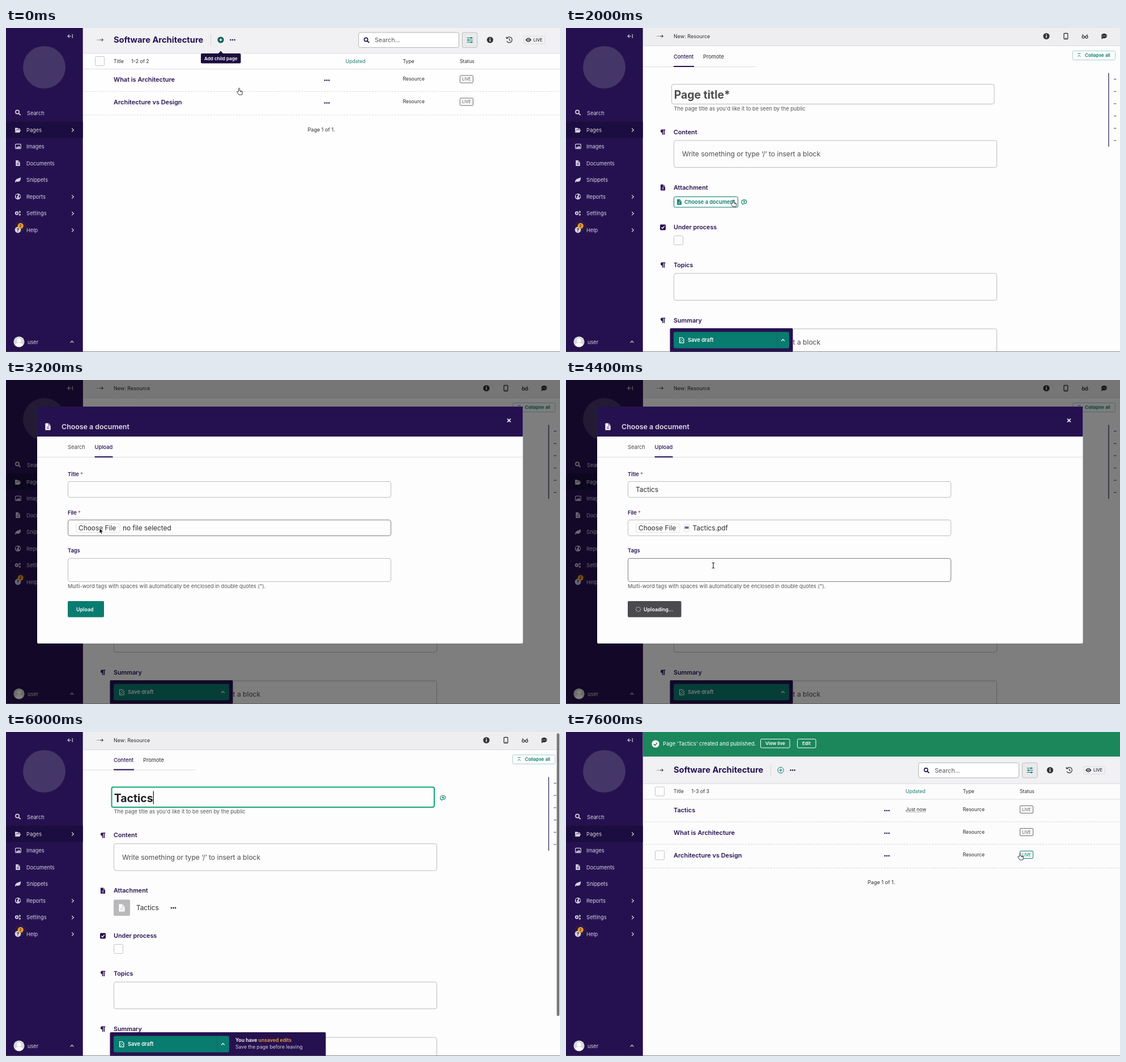
An HTML page that plays this animation: 978x573 px, repeating every 8000 ms.

```html
<!DOCTYPE html>
<html lang="en">
<head>
<meta charset="utf-8">
<title>Adding a child page</title>
<style>
  html, body { margin: 0; width: 100%; height: 100%; overflow: hidden; background: #fff; }
  svg { display: block; width: 978px; height: 573px; font-family: Inter, sans-serif; }
</style>
</head>
<body>
<svg id="stage" viewBox="0 0 978 573"></svg>
<script>
const NAVY = '#261150', DARK = '#1b0d3f', TEAL = '#087c6f', INK = '#2c2c2e', GREY = '#bdbdbf',
      PALE = '#d6d1e0', WHITE = '#fff', PAGE = '#fdfdfd', GOLD = '#eba03c', MID = '#4d4d50';
const LOOP = 8000;

// Drawing helpers; text is placed by the middle of its capitals.
const text = (x, y, s, size = 9.25, fill = INK, weight = 400) =>
  `<text x="${x}" y="${y + size * .36}" font-size="${size}" fill="${fill}" font-weight="${weight}">${s}</text>`;
const bold = (x, y, s, size = 10.75, fill = NAVY) => text(x, y, s, size, fill, 600);
const box = (x, y, w, h, fill, stroke = 'none', r = 0, line = 1) =>
  `<rect x="${x}" y="${y}" width="${w}" height="${h}" rx="${r}" fill="${fill}" stroke="${stroke}" stroke-width="${line}"/>`;
const path = (d, stroke, line = 1.2, fill = 'none', extra = '') =>
  `<path d="${d}" stroke="${stroke}" stroke-width="${line}" fill="${fill}" ${extra}/>`;
const solid = (d, fill) => path(d, 'none', 0, fill);
const disc = (x, y, r, fill, stroke = 'none', line = 1) =>
  `<circle cx="${x}" cy="${y}" r="${r}" fill="${fill}" stroke="${stroke}" stroke-width="${line}"/>`;
const at = (x, y, s, k = 1) => `<g transform="translate(${x} ${y}) scale(${k})">${s}</g>`;
const hline = (x1, x2, y, stroke = '#dcdcde', dash = '') =>
  path(`M${x1} ${y}H${x2}`, stroke, 1, 'none', dash && `stroke-dasharray="${dash}"`);
const dots = (x, y, fill = NAVY, r = 1.3) => [-3.6, 0, 3.6].map(d => disc(x + d, y, r, fill)).join('');
const field = (x, y, w, h, stroke = GREY) => box(x, y, w, h, PAGE, stroke, 3.5);
const checkbox = (x, y) => box(x, y, 16, 16, PAGE, '#c4c4c6', 2);

// Icons
const lens = (x, y, c, k = 1) => at(x, y, disc(-1, -1, 3.1, 'none', c, 1.6) + path('M1.3 1.3L4.6 4.6', c, 1.9), k);
const doc = (x, y, c, gap, k = 1) => at(x, y,
  solid('M-4-5.2H1L4-2.2V5.2H-4Z', c) + path('M1-5V-2H4M-2 .4H2M-2 2.6H2', gap, .8), k);
const chevron = (x, y, c) => path(`M${x - 1.8} ${y - 3}l3.2 3-3.2 3`, c, 1.2);
const caretUp = (x, y, c) => path(`M${x - 2.8} ${y + 1.5}l2.8-2.8 2.8 2.8`, c, 1.2);
const trail = y => [161, 163.4, 165.8].map(x => disc(x, y, .6, INK)).join('') +
  path(`M166 ${y}h5.5m-2.7-2.7l2.7 2.7-2.7 2.7`, INK, 1);
const info = (x, y) => disc(x, y, 5.6, '#333336') + box(x - .8, y - 1, 1.6, 4, WHITE) + disc(x, y - 2.7, .9, WHITE);
const pilcrow = y => at(171, y, solid('M4.5-4.6H-1.2a2.8 2.8 0 0 0 0 5.6V4.8H.4V-3.3H1.6V4.8H3.2V-3.3H4.5Z', NAVY));
const comment = (x, y) => at(x, y, path('M-2.5 3.8C-6 2.6-5.6-3.6 0-3.6S5.6 2.9 0 3.1L-3.2 4.6Z', TEAL, 1.1) +
  path('M-2-.2H2M0-2.2V1.8', TEAL, 1.1));

// Mouse pointers
const arrow = (x, y) => at(x, y, path('M0 0V11.3L2.6 9 4.2 12.8 6.2 12 4.6 8.3H8.2Z', WHITE, 1, '#000'), .82);
const hand = (x, y) => at(x, y, path(
  'M-2 0V-5C-2-6.7.1-6.7.1-5V-1.6L3.6-.9Q5.2-.5 5 1.2L4.2 5.6H-1.4L-4.6 1C-5.3-.4-3.7-1.4-2 .8M1.6-1.2V1M3.4-.8V1',
  '#222', .9, WHITE));
const ibeam = (x, y) => at(x, y, path('M-2.4-5Q0-5 0-3.6Q0-5 2.4-5M0-4V4M-2.4 5Q0 5 0 3.6Q0 5 2.4 5', '#111', 1));

function sidebar() {
  const rows = ['Search', 'Pages', 'Images', 'Documents', 'Snippets', 'Reports', 'Settings', 'Help'];
  const rowY = i => 151 + 29.5 * i;
  const icons = [
    lens(21, 149.5, PALE),
    solid('M16 176.5h4l1.2 1.3h3.6v1.7h-6.3L16 184ZM15.8 185l2.6-4.7h8L24 185Z', PALE),
    box(16.6, 205.3, 9.6, 8, 'none', PALE, 1, 1.2) + solid('M17.5 212.4l2.3-3 1.3 1.5 2-2.8 2.4 4.3Z', PALE),
    doc(21, 239, PALE, NAVY, .95),
    solid('M16 273.5C16 266 21 267 26 264C26.5 271 23 273 18.5 271.5Z', PALE),
    disc(21, 298, 5.2, PALE) + solid('M17 296l3-2.2 1.4 2-2.2 2.4 1.2 3-2.4-1ZM22.5 296l2.6-.6v3l-2 2.6Z', NAVY),
    disc(19, 327.5, 2.2, 'none', PALE, 1.9) + disc(24.3, 325.3, 1.1, 'none', PALE, 1.2) + disc(24.3, 330.2, 1.1, 'none', PALE, 1.2),
    disc(25.7, 350, 10, '#2a1a4a') + disc(21, 357, 5.4, PALE) + text(18.7, 357, '?', 8, NAVY, 700) +
      disc(25.7, 350, 5, '#f2a01d') + text(23.6, 350, '2', 6.6, NAVY, 500),
  ];
  return box(0, 0, 135.7, 573, NAVY) + disc(67.5, 69.5, 37.5, '#443767') +
    path('M109 14.5h6m-3.2-2.8l-2.8 2.8 2.8 2.8M117.3 11v7', PALE, 1.1) +
    box(0, 165.5, 135.7, 29, DARK) +
    rows.map((name, i) => icons[i] + text(i ? 36 : 37, rowY(i), name, 9.25, PALE) +
      ([1, 5, 6, 7].includes(i) ? chevron(118, rowY(i), PALE) : '')).join('') +
    disc(23, 555, 9.6, '#d9d9db') + disc(23, 552.6, 3.7, WHITE) + solid('M16.3 561q1.4-4.2 6.7-4.2t6.7 4.2q-6.7 5.5-13.4 0', WHITE) +
    text(38, 555.5, 'user', 9.25, PALE) + caretUp(116.5, 555, PALE);
}

function listing({ published = false, hover = false }) {
  const dy = published ? 46.5 : 0;
  const rows = [...(published ? ['Tactics'] : []), 'What is Architecture', 'Architecture vs Design'];
  const badge = (y, c) => box(801.5, y - 6.5, 23, 13, PAGE, c, 1.5) + text(805.2, y, 'LIVE', 7.2, c, 500);
  const banner = box(136, 0, 842, 43.5, '#1c875b') + disc(158, 21, 6.6, WHITE) + path('M154.8 21.2l2.3 2.3 4-4.6', '#1c875b', 1.6) +
    text(171, 20.5, "Page 'Tactics' created and published.", 9.25, WHITE) +
    box(343.5, 12.5, 51.5, 15.5, 'none', WHITE, 2) + bold(352, 20.5, 'View live', 8, WHITE) +
    box(408.5, 12.5, 32.5, 15.5, 'none', WHITE, 2) + bold(417, 20.5, 'Edit', 8, WHITE);
  const plus = published
    ? disc(379, 21, 5.2, 'none', TEAL, 1) + path('M376.3 21h5.4M379 18.3v5.4', TEAL, 1.1)
    : disc(379, 21, 5.6, '#0a5f55') + path('M376.3 21h5.4M379 18.3v5.4', WHITE, 1.3);
  const head = box(136, -4, 842, 49, '#f1f0f3') + hline(136, 978, 45, '#dddde0') + trail(21) +
    text(190, 20.7, 'Software Architecture', 14.7, NAVY, 700) + path('M361.5 11v20', '#d4d4d8', 1) + plus + dots(400, 21) +
    box(622.5, 8, 177, 26.5, WHITE, '#b4b4b8', 3) + lens(636.5, 21.5, NAVY) + text(651, 21.5, 'Search...', 10.7, '#57575a') +
    box(805.5, 8, 26.5, 26.5, '#eaeaec', GREY, 3) +
    path('M813.5 17.5h11M813.5 21.2h11M813.5 25h11', TEAL, 1.1) + path('M821 16v3M816.5 19.7v3M821.5 23.5v3', TEAL, 1.8) +
    info(854.5, 21) + path('M884.3 18a5 5 0 1 1-.4 5M883 15.6l.8 3 3-.6M888.6 18.2v3l2 1.4', '#333336', 1.2) +
    box(914, 14.5, 37, 13.5, 'none', '#dcdce0', 2) + solid('M917 21q5.3-7.4 10.6 0q-5.3 7.4-10.6 0', '#333336') +
    disc(922.3, 21, 2.3, WHITE) + disc(922.3, 21, 1.2, '#333336') + bold(931, 21, 'LIVE', 7.4, '#444448');
  const columns = checkbox(157.5, 50.5) + text(190, 58.5, 'Title', 8.7) +
    text(221.5, 58.5, `1-${rows.length} of ${rows.length}`, 8.7) + text(599.5, 58.5, 'Updated', 8.7, '#1f7c70') +
    text(700.5, 58.5, 'Type', 8.7) + text(801, 58.5, 'Status', 8.7) + hline(136, 978, 72.5);
  const body = rows.map((name, i) => {
    const y = 91.5 + 40 * i, last = i === rows.length - 1;
    return bold(190, y, name, 10.95) + dots(566.5, y + 1) + text(700.5, y - 1.5, 'Resource', 8.7) +
      badge(y - 1, hover && last ? TEAL : '#67676a') + (hover && last ? checkbox(157.5, y - 8) : '') +
      (published && !i ? text(599.5, y - 1.5, 'Just now', 8.5) + hline(600, 636, y + 3.5, '#777', '1 1') : '') +
      hline(136, 978, y + (last ? 22.5 : 20.8), '#d8d8da', '3 2');
  }).join('');
  const tip = published ? '' : solid('M375 45l4-4.5 4 4.5Z', DARK) + box(344, 45, 70.5, 17.5, DARK, 'none', 2) +
    bold(350, 53.7, 'Add child page', 8.1, WHITE);
  return box(136, 0, 842, 573, published ? '#fcfcfd' : '#fefefe') +
    at(0, dy, head + columns + body + text(532.5, 99.5 + 40 * rows.length, 'Page 1 of 1.', 9.1) + tip) + (published ? banner : '');
}

const pen = document.createElement('canvas').getContext('2d');
function titleField(typed, focus) {
  pen.font = '700 19.4px Inter, sans-serif';
  const caret = 191.5 + pen.measureText(typed).width;
  return (focus ? box(186.5, 99, 569.5, 35.5, PAGE, '#0fa678', 3, 2) : field(186.5, 99.5, 569.5, 35)) +
    text(190.7, 118, typed || 'Page title*', 19.4, typed ? '#202022' : MID, 700) +
    (focus ? path(`M${caret} 106v23`, '#111', 1.2) + comment(771.5, 117.5) : '');
}

function editor({ typed = '', focus = false, hover = false, attached = false, scroll = 0, bar = false, notice = -1, menu = false }) {
  const label = (y, name, icon = pilcrow(y)) => icon + bold(190, y, name);
  const prompt = 'Write something or type ‘/’ to insert a block';
  const attachment = attached
    ? box(190, 298, 29, 28.5, '#b9b9bb', 'none', 2) + doc(204.5, 312.5, WHITE, '#b9b9bb', 1.25) +
      text(230, 312.5, 'Tactics', 11.8) + dots(295.5, 312.5)
    : box(190.5, 298.5, 113, 18.5, PAGE, TEAL, 2) + doc(200, 307.7, TEAL, WHITE, .95) +
      bold(209, 307.7, 'Choose a document', 9.25, TEAL) + (hover ? comment(314.5, 307.5) : '');
  const content = text(190, 51, 'Content', 9.25, NAVY, 500) + text(242, 51, 'Promote', 9.3) +
    hline(136, 335, 68.5) + box(190, 67, 36, 2, NAVY) +
    titleField(typed, focus) + text(190.5, 142.5, "The page title as you'd like it to be seen by the public", 9.25, '#555558') +
    label(184, 'Content') + field(190.5, 199, 570, 47.5) + text(205, 223, prompt, 12.05, MID) +
    label(282, 'Attachment', doc(171, 282, NAVY, WHITE)) + attachment +
    at(0, attached ? 9.5 : 0,
      label(352.5, 'Under process', box(166, 347.5, 10, 10, NAVY, 'none', 1.5) + path('M168.4 352.6l1.9 1.9 3.4-4', WHITE, 1.4)) +
      checkbox(190.5, 367.5) + label(419, 'Topics') + field(190.5, 434, 570, 47.5) +
      label(517, 'Summary') + field(190.5, 532, 570, 47.5) + text(205, 555.5, prompt, 12.05, MID));
  const header = box(136, 0, 842, 31, '#eeeef0') + hline(136, 978, 31.5, '#dcdcde') + trail(14.5) +
    text(190, 14.5, 'New: Resource', 9) + info(848, 14.5) +
    box(879, 9.5, 6.8, 10, 'none', '#333336', 1, 1.3) + path('M881.4 17.6h2', '#333336', 1) +
    disc(913.2, 16, 2.1, 'none', '#333336', 1.2) + disc(919, 16, 2.1, 'none', '#333336', 1.2) +
    path('M911.2 15.5l1.5-4.7M921 15.5l-1.5-4.7M915.2 15.6h1.8', '#333336', 1) +
    '<ellipse cx="950" cy="14" rx="5.2" ry="4.2" fill="#333336"/>' + solid('M946 15.5l-1 4 4-1.6Z', '#333336') + dots(950, 14, WHITE, .7);
  const tools = box(894.5, 40.5, 75, 16, PAGE, '#a9cfca', 2) + path('M903.5 45.3h5M903.6 50.8l2.4-2.5 2.4 2.5', TEAL, 1) +
    bold(916, 48, 'Collapse all', 8.05, TEAL) + path('M958 79.5V210', NAVY, 1.2) +
    [0, 1, 2, 3, 4, 5].map(i => hline(967, 971.5, 90.5 + 21.7 * i, '#444')).join('');
  const note = notice < 0 ? '' : at(0, notice, box(398, 531, 166.5, 50, NAVY, 'none', 2) +
    bold(405, 544.5, `You have <tspan fill="${GOLD}">unsaved edits</tspan>`, 8.7, WHITE) +
    text(405, 556.5, 'Save the page before leaving', 8.6, PALE));
  const options = menu ? box(183.5, 473, 217, 60, NAVY, 'none', 2) +
    ['Submit for approval', 'Publish'].map((name, i) => box(190, 478 + 28 * i, 204, 27, TEAL) +
      path(`M204 ${496 + 28 * i}v-8m-3 3l3-3 3 3`, WHITE, 1.2) + bold(215, 491.5 + 28 * i, name, 9.25, WHITE)).join('') : '';
  const footer = note + box(183.5, 531, 217, 42, NAVY, 'none', 2) + options + box(190, 537.5, 204, 29, TEAL, 'none', 3) +
    path('M372.5 537.5v29', '#2a5f6a', 1) + caretUp(383, 552, WHITE) +
    path('M200.5 547.5h4.5l3 3v6.5h-7.5Z', WHITE, 1.1) + path('M201 552l5 5M202.5 549.5l5 5M201 555l2 2', WHITE, .8) +
    bold(215, 552, 'Save draft', 9.25, WHITE);
  const thumb = bar ? box(972.3, 1 + scroll * .86, 4.6, 500, '#77777a', 'none', 2.3) : '';
  return box(136, 0, 842, 573, PAGE) + at(0, -scroll, content) + header + tools + footer + thumb;
}

function chooser(y, height, upload, body) {
  const tab = (x, w, name, on) => text(x, 72, name, 9.3, on ? NAVY : '#48484b', on ? 500 : 400) + (on ? box(x, 88, w, 2, NAVY) : '');
  return box(0, 0, 978, 573, 'rgba(0,0,0,.5)') + at(0, y,
    box(55, 0, 857.5, height, PAGE, 'none', 2) + box(55, 0, 857.5, 53, NAVY) +
    doc(74, 35.5, WHITE, NAVY, 1.15) + bold(98, 35.5, 'Choose a document', 12.4, '#e0dce8') +
    path('M885 21.5l6 6m0-6l-6 6', WHITE, 1.7) +
    hline(55, 912, 89.5) + tab(109, 31, 'Search', !upload) + tab(156.5, 32, 'Upload', upload) + body);
}

function searchTab() {
  const long = 'Instructions for The Formatting of Final Thesis Papers';
  const rows = [['arch vs design', 'arch_vs_design', '6 days ago'], ['What is Architectue', 'What_is_Architectue', '1 week ago'],
    [long, long.replaceAll(' ', '_'), '1 week ago']];
  return chooser(51, 411, false, bold(109, 119.5, 'Search term', 9.25) + field(109.5, 132.5, 570, 28) +
    text(123, 147, 'Search', 12, MID) + bold(109, 188, 'Latest documents') +
    text(117, 217, 'Title', 8.2) + text(455, 217, 'File', 8.2) + text(746.5, 217, 'Created', 8.2) + hline(109, 858, 228.5) +
    rows.map(([name, file, age], i) => {
      const y = 246.5 + 34.2 * i;
      return bold(117, y, name, 10.95) + text(455, y - .5, file + '.pdf', 8.5) + text(746.5, y - .5, age, 8.3) +
        hline(747, 789, y + 4, '#777', '1 1') + hline(109, 858, y + 17, '#d2d2d4', '3 2');
    }).join('') + text(460, 355, 'Page 1 of 1.', 8.8));
}

function uploadTab({ file = false, fileActive = false, press = '' }) {
  const star = '<tspan fill="#cd4444"> *</tspan>', busy = press === 'busy';
  const active = on => on ? '#808083' : GREY;
  const spinner = [...Array(8)].map((_, i) => {
    const a = i * Math.PI / 4;
    return disc(127.5 + 4 * Math.cos(a), 358.5 + 4 * Math.sin(a), .75, WHITE);
  }).join('');
  return chooser(47, 419, true,
    bold(109, 119.5, 'Title' + star, 9.25) + field(109.5, 132.5, 570, 28) + (file ? text(123, 147, 'Tactics', 11.9) : '') +
    bold(109, 187.5, 'File' + star, 9.25) + field(109.5, 200.5, 570, 28, active(fileActive)) +
    box(123.5, 207, 77.5, 15.5, WHITE, '#e2e2e4', 3) + text(128, 215, 'Choose File', 11.9) +
    (file ? box(208.5, 208, 9, 13, WHITE, '#ddd', 1) + box(209.5, 212, 7, 4, '#66709c') + text(223.5, 215, 'Tactics.pdf', 11.9)
          : text(206, 215, 'no file selected', 11.9)) +
    bold(109, 255, 'Tags', 9.25) + field(109.5, 268.5, 570, 41, active(busy)) +
    text(109, 318, 'Multi-word tags with spaces will automatically be enclosed in double quotes (").', 9.25, '#555558') +
    (busy ? box(109, 344, 94.5, 28.5, '#4b4b4d', 'none', 2) + spinner + bold(137, 358.5, 'Uploading…', 8.9, WHITE)
          : box(109, 344, 64, 28.5, press ? '#0a5f55' : TEAL, 'none', 2) + bold(124, 358.5, 'Upload', 8.9, WHITE)));
}

const blank = () => editor({}) + sidebar();
const draft = { attached: true, notice: 0, focus: true };
const scenes = [
  [0, () => listing({}) + hand(412.5, 112.5)],
  [600, () => editor({}) + arrow(384, 49)],
  [1600, () => editor({}) + arrow(300, 338)],
  [2000, () => editor({ hover: true }) + hand(296, 310.5)],
  [2400, () => blank() + searchTab() + arrow(377.5, 141)],
  [2800, () => blank() + uploadTab({}) + arrow(180, 396)],
  [3200, () => blank() + uploadTab({ fileActive: true }) + arrow(165, 262)],
  [3600, () => blank() + uploadTab({ file: true, fileActive: true }) + arrow(368, 396)],
  [4000, () => blank() + uploadTab({ file: true, press: 'hover' }) + hand(152, 407)],
  [4400, () => blank() + uploadTab({ file: true, press: 'busy' }) + ibeam(260, 328)],
  [4800, () => editor({ attached: true, notice: 5 }) + arrow(342.5, 94.5)],
  [5200, () => editor({ ...draft, typed: 'T' })],
  [5600, () => editor({ ...draft, typed: 'Tacti' })],
  [6000, () => editor({ ...draft, typed: 'Tactics', scroll: 1.4, bar: true })],
  [6400, () => editor({ ...draft, typed: 'Tactics', scroll: 84, bar: true }) + hand(384, 555)],
  [6800, () => editor({ ...draft, typed: 'Tactics', focus: false, scroll: 84, bar: true, menu: true }) + hand(290, 522)],
  [7200, () => listing({ published: true }) + arrow(837, 330)],
  [7600, () => listing({ published: true, hover: true }) + hand(802.5, 220.5)],
];

const stage = document.getElementById('stage');
let shown;
function frame() {
  const t = performance.now() % LOOP;
  const scene = scenes.findLast(([start]) => start <= t);
  if (scene !== shown) {
    shown = scene;
    stage.innerHTML = sidebar() + scene[1]() + box(0, 572.3, 978, 1, '#55555a');
  }
  requestAnimationFrame(frame);
}
frame();
</script>
</body>
</html>
```
